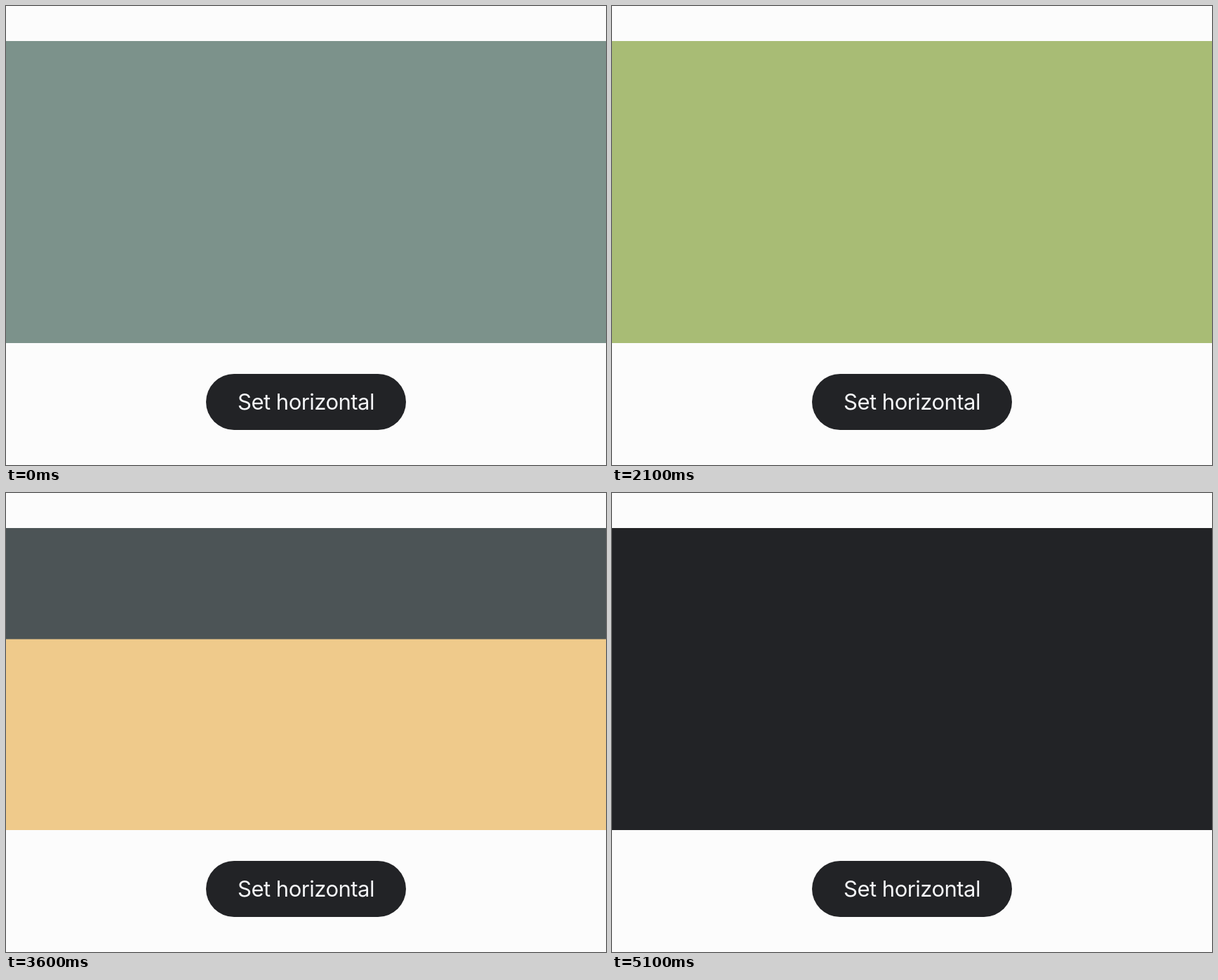
Recreate the animation shown at these times as an HTML page. Size 855x655 px, loop 5200 ms.

```html
<!DOCTYPE html>
<html lang="en">
<head>
<meta charset="utf-8">
<title>Vertical carousel</title>
<style>
  html, body { margin: 0; width: 100%; height: 100%; overflow: hidden; background: #fcfcfc; }
  .view { position: absolute; left: 0; top: 50px; width: 855px; height: 431px; overflow: hidden; }
  .slide { height: 431px; }
  .button {
    position: absolute; left: 285px; top: 525px; width: 285px; height: 80px;
    border-radius: 40px; background: #222326; color: #f5f6f8;
    font: 400 31px/79px Inter, sans-serif; letter-spacing: -0.5px;
    text-align: center; white-space: nowrap;
  }
</style>
</head>
<body>
<div class="view"><div id="track"></div></div>
<div class="button">Set horizontal</div>
<script>
  const LOOP = 5200, SLIDE_TIME = 300, HEIGHT = 431;
  const colors = ['#7c928b', '#a8bc75', '#4c5456', '#efca8b', '#222326'];
  const starts = [966, 2177, 3491, 4743];
  const track = document.getElementById('track');

  for (const color of colors) {
    const slide = document.createElement('div');
    slide.className = 'slide';
    slide.style.background = color;
    track.append(slide);
  }

  const at = (time, index, easing = 'linear') => ({
    offset: time / LOOP, transform: `translateY(${-index * HEIGHT}px)`, easing
  });
  const steps = [at(0, 0)];
  starts.forEach((time, i) => steps.push(at(time, i, 'ease'), at(time + SLIDE_TIME, i + 1)));
  steps.push(at(LOOP, starts.length));

  const motion = track.animate(steps, { duration: LOOP, iterations: Infinity });
  motion.startTime = document.timeline.currentTime;
</script>
</body>
</html>
```
